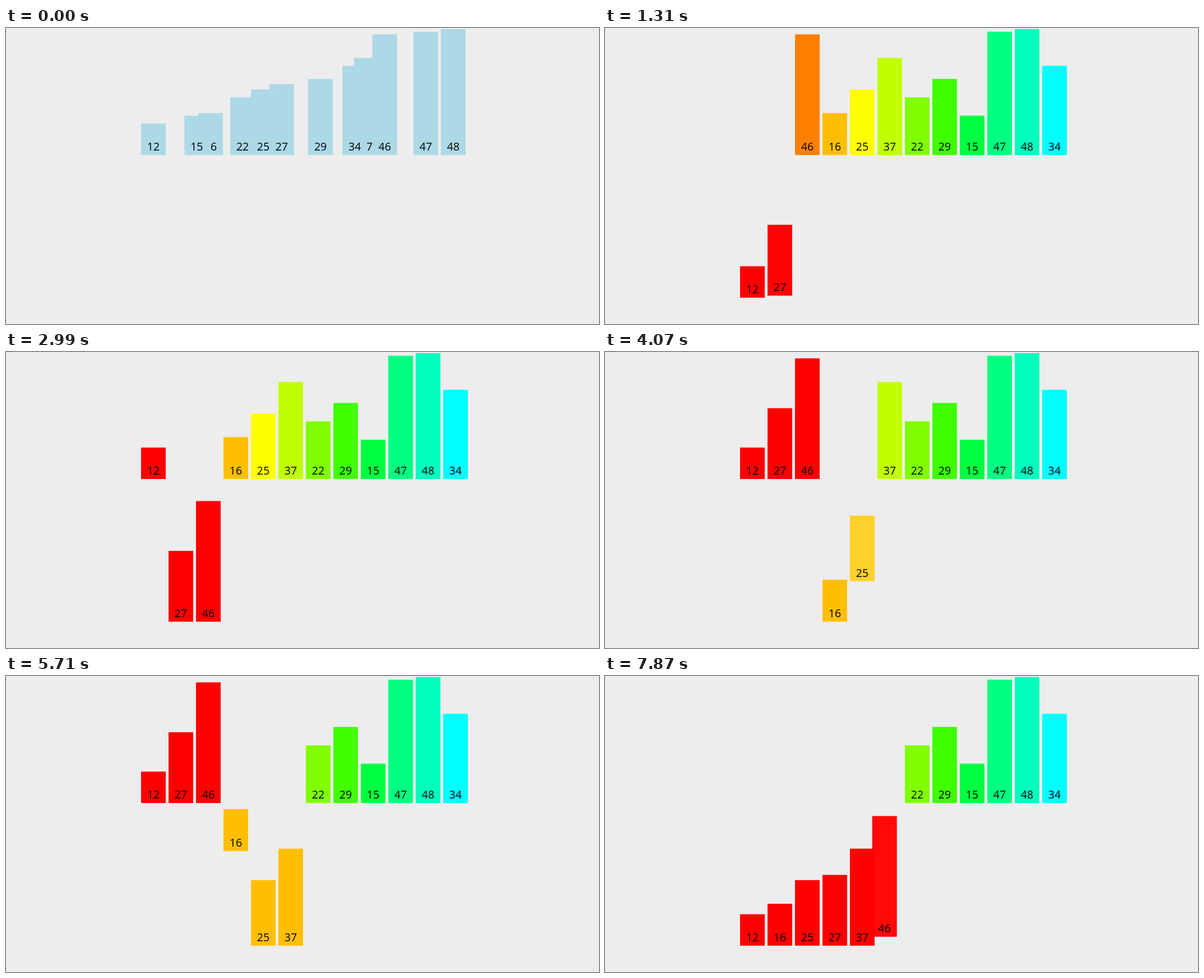
Recreate the animation shown at these times as an HTML page. Size 1058x529 px, loop 8000 ms.

```html
<!DOCTYPE html>
<html lang="en">
<head>
<meta charset="utf-8">
<title>Merge sort</title>
<style>
  html, body { margin: 0; width: 100%; height: 100%; overflow: hidden; background: #ededed; }
  svg { display: block; width: 100%; height: 100%; }
  text { font: 19.5px "Open Sans", "Noto Sans", sans-serif; text-anchor: middle; }
</style>
</head>
<body>
<svg id="stage" viewBox="0 0 1058 529"></svg>
<script>
const LOOP = 8000;
const STEP = 235.1;      // ms per sorting step
const HEAD_START = 0.27; // the loop opens inside the first step
const LEFT = 241, PITCH = 49, WIDTH = 44, BASE = 227, DROP = 255, UNIT = 225 / 48;
const LIGHT_BLUE = [173, 216, 230];
const values = [12, 27, 46, 16, 25, 37, 22, 29, 15, 47, 48, 34];

const lerp = (a, b, p) => a + (b - a) * p;
const cubicInOut = p => p < 0.5 ? 4 * p ** 3 : 1 - 4 * (1 - p) ** 3;
const brighten = color => color.map(c => Math.min(255, c + 150));

// Rainbow from red to cyan in 15 degree steps, without pure green.
function rainbow(i) {
  const hue = 15 * (i < 8 ? i : i + 1);
  const channel = offset => {
    const k = (offset + hue / 30) % 12;
    return 255 * (0.5 - Math.max(-1, Math.min(k - 3, 9 - k, 1)) / 2);
  };
  return [channel(0), channel(8), channel(4)];
}

// Each state lists the pose of every bar.
const ranks = [...values].sort((a, b) => a - b);
const bars = values.map(v => ({ slot: ranks.indexOf(v), down: 0, color: LIGHT_BLUE, lit: false }));
const order = values.map((_, i) => i);
const states = [];
const record = () => states.push(bars.map(b => ({
  slot: b.slot, down: b.down, color: b.lit ? brighten(b.color) : b.color
})));

function merge(lo, mid, hi) {
  const left = order.slice(lo, mid), right = order.slice(mid, hi), merged = [];
  const color = bars[left[0]].color;
  const compareHeads = () => {
    for (const part of [left, right]) if (part.length) bars[part[0]].lit = true;
    record();
  };
  compareHeads();
  while (left.length || right.length) {
    const takeLeft = !right.length || (left.length && values[left[0]] <= values[right[0]]);
    const id = (takeLeft ? left : right).shift();
    Object.assign(bars[id], { slot: lo + merged.length, down: 1, color, lit: false });
    merged.push(id);
    compareHeads();
  }
  merged.forEach((id, i) => {
    order[lo + i] = id;
    bars[id].down = 0;
    record();
  });
}

function sort(lo, hi) {
  if (hi - lo < 2) return;
  const mid = Math.ceil((lo + hi) / 2);
  sort(lo, mid);
  sort(mid, hi);
  merge(lo, mid, hi);
}

// Shuffle, rest for one step, colour the bars, then sort.
record();
bars.forEach((b, i) => b.slot = i);
record();
record();
bars.forEach((b, i) => b.color = rainbow(i));
record();
sort(0, values.length);

const stage = document.getElementById("stage");
function add(parent, tag, attrs = {}) {
  const node = document.createElementNS(stage.namespaceURI, tag);
  for (const name in attrs) node.setAttribute(name, attrs[name]);
  return parent.appendChild(node);
}

const shapes = values.map(v => {
  const group = add(stage, "g");
  const rect = add(group, "rect", { y: BASE - v * UNIT, width: WIDTH, height: v * UNIT });
  add(group, "text", { x: WIDTH / 2, y: BASE - 8 }).textContent = v;
  return { group, rect };
});

function draw(time) {
  const position = HEAD_START + time / STEP;
  const index = Math.floor(position);
  const p = cubicInOut(position - index);
  shapes.forEach(({ group, rect }, i) => {
    const a = states[index][i], b = states[index + 1][i];
    const x = LEFT + PITCH * lerp(a.slot, b.slot, p);
    const y = DROP * lerp(a.down, b.down, p);
    const color = a.color.map((c, k) => Math.round(lerp(c, b.color[k], p)));
    group.setAttribute("transform", `translate(${x.toFixed(2)} ${y.toFixed(2)})`);
    rect.setAttribute("fill", `rgb(${color})`);
  });
}

const begin = performance.now();
function frame() {
  draw((performance.now() - begin) % LOOP);
  requestAnimationFrame(frame);
}
frame();
</script>
</body>
</html>
```
